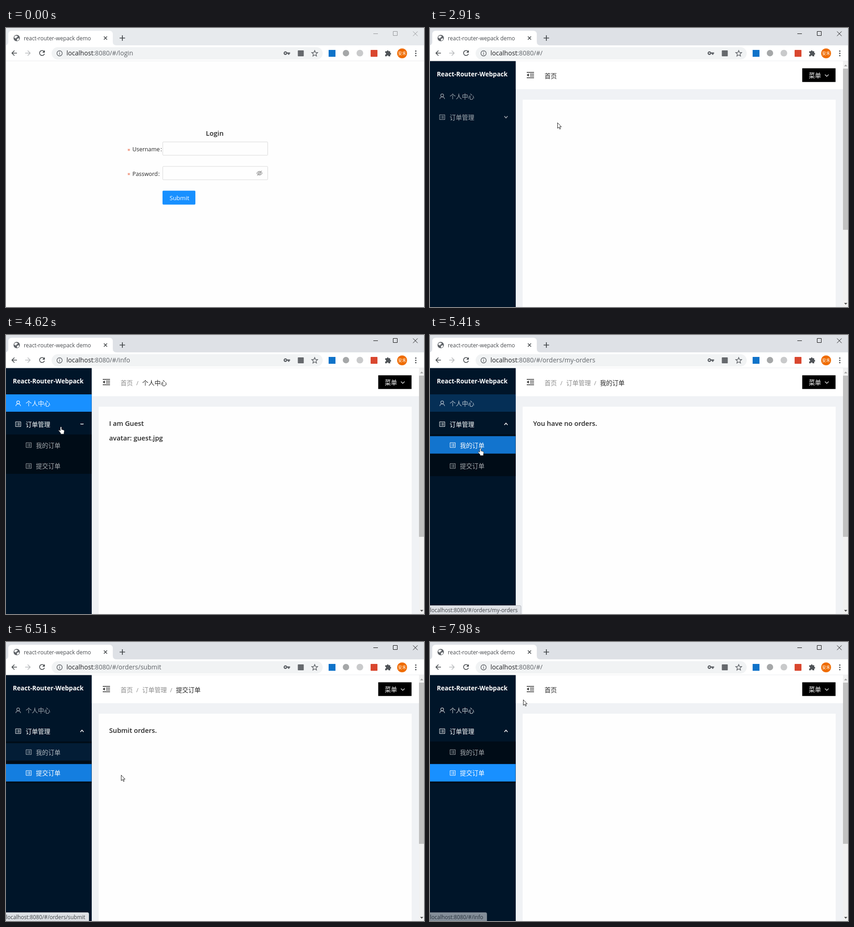
These frames come from a looping animation (916x611 px, 8000 ms). An HTML page with a canvas:

```html
<!DOCTYPE html>
<html lang="en">
<head>
<meta charset="utf-8">
<title>Router demo</title>
<style>
  html, body { margin: 0; width: 100%; height: 100%; overflow: hidden; background: #fff; }
  canvas { display: block; width: 916px; height: 611px; }
  #status {
    position: absolute; left: 0; top: 592px; height: 18px; padding-right: 7px; overflow: hidden;
    border: solid #b9bcc1; border-width: 1px 1px 0 0; border-radius: 0 4px 0 0; background: #dee1e6;
    color: #3f4246; font: 11.75px/19px "Open Sans", "Noto Sans", sans-serif; white-space: nowrap; opacity: 0;
  }
</style>
</head>
<body>
<canvas width="916" height="611"></canvas>
<div id="status"></div>
<script>
const ctx = document.querySelector('canvas').getContext('2d');
const statusBar = document.getElementById('status');
const LOOP = 8000;
const FONT = '"Open Sans", "Noto Sans CJK SC", "Noto Sans CJK", "Noto Sans", sans-serif';
const CJK = '"Noto Sans CJK SC", "Noto Sans CJK", "Noto Sans", sans-serif';
const BLUE = '#1890ff', INK = 'rgba(0,0,0,.85)', GREY = '#5f6368';

// Page layout: viewport top, sidebar width, menu row pitch and height
const TOP = 72.55, SIDE = 187.7, PITCH = 45.8, ROW = 38.2;
const rowTop = i => 129.9 + i * PITCH;

// Times of the user's actions
const CLICK = { name: 530, password: 1230, login: 2120, info: 3540, submenu: 4420, mine: 5200, submit: 6280, home: 7390 };
const NAME_TYPED = 980, PASS_TYPED = 1460;

// Pointer path: time, x, y of the hot spot
const PATH = [
  [50, 40, 592], [180, 120, 490], [330, 270, 340], [490, 390, 260], [1130, 390, 260], [1220, 434, 316],
  [1480, 434, 316], [1590, 412, 354], [1770, 412, 354], [1900, 371, 373], [2690, 371, 373], [2910, 280, 207],
  [3100, 182, 166], [3300, 92, 147], [3850, 92, 147], [4080, 112, 172], [4290, 119, 201], [4700, 119, 201],
  [4900, 112, 232], [5110, 108, 243], [5380, 108, 243], [5600, 112, 280], [5830, 114, 291], [6330, 114, 291],
  [6450, 204, 293], [6560, 290, 290], [6670, 326, 246], [6800, 308, 180], [6930, 281, 116], [7020, 268, 105],
  [7470, 268, 105], [7610, 215, 122], [7720, 160, 144], [7820, 150, 147], [7980, 204, 126]
];
// Links in the status bar: shown from, fading from, path
const LINKS = [
  [3170, 4000, 'info'], [4890, 5510, 'orders/my-orders'], [5510, 6780, 'orders/submit'], [7680, 7900, 'info']
];

const clamp = v => Math.max(0, Math.min(1, v));
const ramp = (t, start, length = 300) => { const p = clamp((t - start) / length); return p * p * (3 - 2 * p); };
const pulse = (t, start, end) => ramp(t, start) * (1 - ramp(t, end));
const mix = (a, b, p) => a + (b - a) * p;

function rect(x, y, w, h, color, r = 0) {
  ctx.fillStyle = color;
  ctx.beginPath();
  ctx.roundRect(x, y, w, h, r);
  ctx.fill();
}
function disc(x, y, r, color) {
  ctx.fillStyle = color;
  ctx.beginPath();
  ctx.arc(x, y, r, 0, 7);
  ctx.fill();
}
function stroke(d, color, width = 1, x = 0, y = 0) {
  ctx.save();
  ctx.translate(x, y);
  ctx.strokeStyle = color;
  ctx.lineWidth = width;
  ctx.stroke(new Path2D(d));
  ctx.restore();
}
function fill(d, color, x = 0, y = 0) {
  ctx.save();
  ctx.translate(x, y);
  ctx.fillStyle = color;
  ctx.fill(new Path2D(d), 'evenodd');
  ctx.restore();
}
function text(s, x, y, size, color, weight = 400, family = FONT) {
  ctx.font = `${weight} ${size}px ${family}`;
  ctx.fillStyle = color;
  ctx.fillText(s, x, y);
  return ctx.measureText(s).width;
}
const han = (s, x, middle, color, size = 13.5) => text(s, x, middle + size * .38, size, color, 400, CJK);

function pointerAt(t) {
  const i = PATH.findIndex(p => p[0] > t);
  if (i < 0) return PATH.at(-1).slice(1);
  if (i === 0) return null;
  const [a, b] = [PATH[i - 1], PATH[i]], p = (t - a[0]) / (b[0] - a[0]);
  return [mix(a[1], b[1], p), mix(a[2], b[2], p)];
}

function route(t) {
  if (t < CLICK.login) return 'login';
  if (t < CLICK.info) return '';
  if (t < CLICK.mine) return 'info';
  if (t < CLICK.submit) return 'orders/my-orders';
  if (t < CLICK.home) return 'orders/submit';
  return '';
}

function drawBrowser(t) {
  const active = t >= CLICK.name;
  const control = active ? '#111' : '#929497';
  rect(0, 0, 916, 38, active ? '#dee1e6' : '#e7eaed');
  fill('M-3 38Q5 38 5 30V14Q5 6 13 6H226Q234 6 234 14V30Q234 38 242 38Z', '#fff');
  rect(0, 38, 916, 35, '#fff');
  rect(0, 71.8, 916, TOP - 71.8, '#d5d8dc');
  disc(23.5, 22, 7, GREY);
  fill('M18 20Q20 16 24 17L26 19 23 21 22 23 19 22ZM24 24L28 22 29 25Q27 28 24 28Z', '#fff');
  text('react-router-wepack demo', 39, 26.5, 11.9, '#484b4f');
  stroke('M214.5 18.5l7 7m0-7l-7 7', '#3c4043', 1.5);
  stroke('M249 22h12m-6-6v12', '#3c4043', 1.7);
  stroke('M805 12.5h10M848.5 7.5h9v9h-9zM892 7.5l10 10m0-10l-10 10', control);

  stroke('M24 55H13m5.5-5.5L13 55l5.5 5.5', '#45494d', 1.6);
  stroke('M42 55h11m-5.5-5.5L53 55l-5.5 5.5', '#babcbe', 1.6);
  stroke('M83.5 51.5A5.5 5.5 0 1 0 84.3 56.5', '#45494d', 1.6);
  fill('M85 48.5v5.5h-5.5z', '#45494d');

  rect(100, 42, 594, 27, '#f1f3f4', 13.5);
  stroke('M123.2 55.5a5.8 5.8 0 1 1-11.6 0a5.8 5.8 0 1 1 11.6 0M117.4 54.5v4M117.4 51.8v1.5', GREY, 1.4);
  const host = text('localhost', 132.5, 60, 14.05, '#202124');
  text(':8080/#/' + route(t), 132.5 + host, 60, 14.05, GREY);
  if (t < NAME_TYPED || t >= CLICK.login)
    fill('M616 53.6h6.5v3h-1.5v2h-3v-2h-2a4 4 0 1 1 0-3zM612.3 53.6a1.5 1.5 0 1 0 .01 0z', GREY);
  rect(639.5, 49, 13, 13, '#66696d', 1);
  stroke('M676.5 49.2l1.8 4.3 4.7.4-3.6 3 1.1 4.6-4-2.5-4 2.5 1.1-4.6-3.6-3 4.7-.4z', GREY, 1.4);
  rect(707, 48, 15, 15, '#0f73c9');
  disc(745, 55, 7, '#a5a7a8');
  disc(775.5, 55, 7.3, '#c9cacb');
  rect(799, 48, 15, 15, '#d9472f', 1);
  fill('M831 51h3.5a2 2 0 1 1 4 0h3.5v3.5a2 2 0 1 1 0 4V62h-3.8a2 2 0 0 0-4 0H831v-3.8a2 2 0 0 0 0-4z', '#505458');
  disc(868, 55.5, 10.8, '#ef6c00');
  han('安禾', 859, 55.5, '#fff', 9);
  for (const y of [50.5, 55.5, 60.5]) disc(898, y, 1.5, '#4a4d51');
}

function drawField(y, focus) {
  ctx.beginPath();
  ctx.roundRect(343.5, y + .5, 230, 29.2, 1.5);
  ctx.lineWidth = 1;
  ctx.strokeStyle = `rgb(${mix(217, 64, focus)},${mix(217, 169, focus)},${mix(217, 255, focus)})`;
  ctx.stroke();
}

function drawLogin(t) {
  rect(0, TOP, 916, 539, '#fefefe');
  text('Login', 438, 235.5, 14.8, INK, 600);
  for (const [label, y, colon] of [['Username', 264.5, 338.5], ['Password', 318, 333.5]]) {
    text('*', 265.3, y + 8.3, 13, '#e8603c', 400, '"DejaVu Sans Mono", monospace');
    text(label, 277, y + 5.5, 12.4, INK);
    text(':', colon, y + 5.5, 12.4, INK);
  }
  drawField(249, pulse(t, CLICK.name, CLICK.password));
  drawField(302.6, ramp(t, CLICK.password, 210));

  const letters = clamp(Math.floor((t - NAME_TYPED) / 45 + 1) / 5) * 5;
  const nameWidth = text('guest'.slice(0, letters), 354, 269.5, 12.9, INK);
  const dots = clamp(Math.floor((t - PASS_TYPED) / 25 + 1) / 5) * 5;
  for (let i = 0; i < dots; i++) disc(357.5 + i * 6.5, 318, 2.3, '#262626');
  if (t >= CLICK.password) rect(354.5 + dots * 6.5, 309, 1, 18, '#222');
  else if (t >= CLICK.name) rect(354.5 + nameWidth, 256, 1, 18, '#222');

  stroke('M549.5 318Q555.5 309.5 561.5 318Q555.5 326.5 549.5 318ZM558 318a2.5 2.5 0 1 1-5 0a2.5 2.5 0 1 1 5 0M550.5 323.5l10-11', '#8c8c8c', 1.1);
  const hover = ramp(t, 1830);
  rect(343, 356.2, 72, 30.5, `rgb(${mix(24, 64, hover)},${mix(144, 169, hover)},255)`, 2);
  text('Submit', 358.5, 377, 13, '#fff');
}

function menuIcon(x, y, color) {
  stroke('M.5.5h11.4v10.4H.5zM2.8 3.4h1.2M5.4 3.4h4.4M2.8 5.7h1.2M5.4 5.7h4.4M2.8 8h1.2M5.4 8h4.4', color, 1, x, y - 5.7);
}

function drawSidebar(t) {
  const info = pulse(t, CLICK.info, CLICK.mine);
  const mine = pulse(t, CLICK.mine, CLICK.submit);
  const submit = ramp(t, CLICK.submit);
  const tone = p => `rgba(255,255,255,${mix(.65, 1, clamp(p))})`;
  const highlight = (row, p) => { ctx.globalAlpha = p; rect(0, rowTop(row), SIDE, ROW, BLUE); ctx.globalAlpha = 1; };

  rect(0, TOP, SIDE, 539, '#001529');
  text('React-Router-Webpack', 15, 105.5, 13.6, '#fff', 700);
  highlight(0, info);
  const infoTone = tone(info + pulse(t, 3170, 3960) + pulse(t, 7680, 7830));
  stroke('M29.8 147.5a3.1 3.1 0 1 1-6.2 0a3.1 3.1 0 1 1 6.2 0M21.5 155.5Q22 151 26.7 151Q31.4 151 32 155.5', infoTone, 1.2);
  han('个人中心', 43, 149.5, infoTone);

  const parentTone = tone(ramp(t, 4130));
  menuIcon(20.5, 195.3, parentTone);
  han('订单管理', 43, 195.5, parentTone);
  const tip = mix(2, -2, ramp(t, CLICK.submenu + 60, 300));
  stroke(`M-3.5 ${-tip}L0 ${tip}L3.5 ${-tip}`, parentTone, 1.6, 166.5, 195);

  const subTop = rowTop(2) - 3.8;
  const height = 2 * PITCH * ramp(t, CLICK.submenu, 235);
  if (!height) return;
  ctx.save();
  ctx.beginPath();
  ctx.rect(0, subTop, SIDE, height);
  ctx.clip();
  rect(0, subTop, SIDE, 2 * PITCH, '#000c17');
  highlight(2, mine);
  highlight(3, submit);
  const mineTone = tone(mine + pulse(t, 4890, 5510));
  const submitTone = tone(submit + ramp(t, 5510));
  menuIcon(43.5, 241.1, mineTone);
  han('我的订单', 65.5, 241.5, mineTone);
  menuIcon(43.5, 286.9, submitTone);
  han('提交订单', 65.5, 287.3, submitTone);
  ctx.restore();
}

function drawBreadcrumb(t, path) {
  const crumbs = { '': [], info: ['个人中心'], 'orders/my-orders': ['订单管理', '我的订单'], 'orders/submit': ['订单管理', '提交订单'] }[path];
  const homeTone = crumbs.length ? mix(.45, .85, ramp(t, 7040, 180)) : .85;
  han('首页', 251, 104.5, `rgba(0,0,0,${homeTone})`);
  crumbs.forEach((crumb, i) => {
    text('/', 285.5 + i * 74, 109.5, 13, 'rgba(0,0,0,.45)');
    han(crumb, 298.5 + i * 74, 104.5, i === crumbs.length - 1 ? INK : 'rgba(0,0,0,.45)');
  });
}

function drawApp(t) {
  const path = route(t);
  rect(SIDE, TOP, 905 - SIDE, 539, '#f0f2f5');
  rect(SIDE, TOP, 905 - SIDE, 61.5, '#fff');
  rect(203, 157, 686, 454, '#fefefe');
  stroke('M212 97.2h16M219 101h9M219 105h9M212 109h16', '#262626', 1.5);
  fill('M212 103l4.5-3.2v6.4z', '#262626');
  drawBreadcrumb(t, path);
  rect(815.7, 88.2, 73, 30, '#000');
  han('菜单', 830, 103.5, '#fff');
  stroke('M865.5 102l4 4 4-4', '#fff', 1.1);

  const lines = {
    '': [], info: ['I am Guest', 'avatar: guest.jpg'],
    'orders/my-orders': ['You have no orders.'], 'orders/submit': ['Submit orders.']
  }[path];
  lines.forEach((line, i) => text(line, 226, 199 + i * 32, 14.7, INK, 600));

  rect(905, TOP, 11, 539, '#f1f1f1');
  rect(905, 89, 11, 353, '#c1c1c1');
  fill('M907.5 84l3.5-4 3.5 4z', '#a3a3a3');
  fill('M907.5 602l3.5 4 3.5-4z', '#505050');
  drawSidebar(t);
}

function drawStatus(t) {
  const link = LINKS.findLast(([start]) => t >= start);
  statusBar.style.opacity = link ? 1 - clamp((t - link[1]) / 200) : 0;
  if (link) statusBar.textContent = 'localhost:8080/#/' + link[2];
}

function drawPointer(t) {
  const at = pointerAt(t);
  if (!at) return;
  const [x, y] = at.map(Math.round);
  const inside = (l, top, r, b) => x >= l && x < r && y >= top && y < b;
  const login = t < CLICK.login;
  const beam = login && (inside(343, 249, 574, 279) || inside(343, 303, 545, 333));
  const hand = login ? inside(343, 356, 415, 387)
    : inside(0, 130, 188, 168) || inside(0, 176, 188, 310) && t > CLICK.info || inside(251, 96, 278, 113);
  if (beam) {
    stroke('M-3 -6.5h2.5M.5 -6.5h2.5M0 -6v12M-3 6.5h2.5M.5 6.5h2.5', '#222', 1, x + .5, y);
  } else if (hand) {
    const d = 'M0 1.5Q0-.2 1.5 0Q2.8.2 2.8 1.5V6l1.8.3 1.8.6 1.6.6Q9 8 8.8 10l-.8 3v3H.8v-2L-2 10.5Q-4.5 8-3.2 7.3Q-2 6.8 0 9z';
    fill(d, '#fff', x, y);
    stroke(d, '#222', .8, x, y);
  } else {
    const d = 'M.5.5v12.2l2.8-2.6 2 4.4 1.9-.9-2-4.2h3.7z';
    fill(d, '#fff', x, y);
    stroke(d, '#222', 1, x, y);
  }
}

function draw(now) {
  const t = now % LOOP;
  drawBrowser(t);
  (t < CLICK.login ? drawLogin : drawApp)(t);
  drawPointer(t);
  drawStatus(t);
  requestAnimationFrame(draw);
}
requestAnimationFrame(draw);
</script>
</body>
</html>
```
